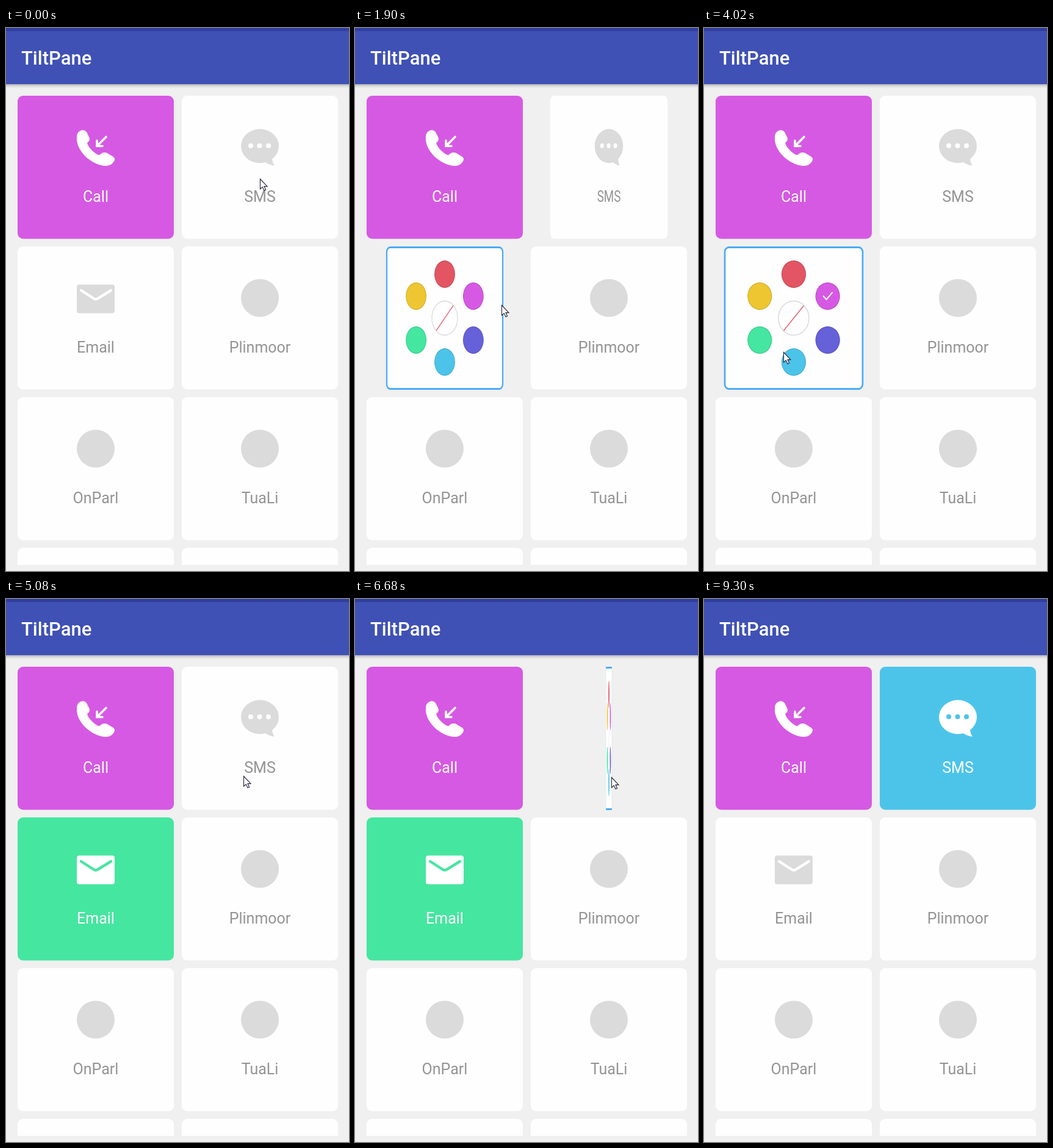
Recreate the animation shown at these times as an HTML page. Size 562 by 890 pixels, loop 9550 ms.

```html
<!DOCTYPE html>
<html lang="en">
<head>
<meta charset="utf-8">
<title>Flip cards</title>
<style>
  html, body { margin: 0; width: 100%; height: 100%; overflow: hidden; background: #f0f0f0; }
  svg { display: block; width: 100%; height: 100%; }
  text { font-family: Roboto, "Liberation Sans", sans-serif; }
  .label { font-size: 25px; text-anchor: middle; }
  .line { stroke-linecap: round; }
</style>
</head>
<body>
<svg id="stage" viewBox="0 0 562 890">
  <defs>
    <linearGradient id="shade" x2="0" y2="1">
      <stop offset="0" stop-color="#000" stop-opacity=".27"/>
      <stop offset=".5" stop-color="#000" stop-opacity=".08"/>
      <stop offset="1" stop-color="#000" stop-opacity="0"/>
    </linearGradient>
    <clipPath id="list"><rect width="562" height="880"/></clipPath>
  </defs>
  <rect width="562" height="890" fill="#f0f0f0"/>
  <g id="cards" clip-path="url(#list)"></g>
  <rect y="92" width="562" height="7" fill="url(#shade)"/>
  <rect width="562" height="92" fill="#3f51b5"/>
  <rect width="562" height="5" fill="#303f9f"/>
  <text x="25" y="60" font-size="31" font-weight="500" fill="#fff">TiltPane</text>
  <path id="cursor" d="M.5 .5V17L4.3 13.6L7 19.4L9.6 18.2L7 12.6H12Z" fill="#fff" stroke="#23233a" stroke-width="1.1"/>
</svg>
<script>
const LOOP = 9550, FLIP = 500;
const WHITE = '#fefefe', GREY = '#dbdbdb', TEXT = '#949494';
const COLORS = ['#e35562', '#d659e3', '#6661d9', '#4cc4ea', '#45e6a0', '#edc632'];
const NONE = -1, PURPLE = 1, CYAN = 3, GREEN = 4;

const $ = id => document.getElementById(id);

function add(parent, tag, attrs, text) {
  const el = document.createElementNS('http://www.w3.org/2000/svg', tag);
  for (const name in attrs) el.setAttribute(name, attrs[name]);
  if (text) el.textContent = text;
  parent.appendChild(el);
  return el;
}

// Drawn around the card centre; "ink" is the icon, "gap" shows the card colour.
const ICONS = {
  phone: `<path class="ink" d="M-27-59Q-20-64-15-58L-11-50Q-8-45-14-40C-12-32-1-22 6-20Q11-26 18-24L28-18Q33-15 30-10Q25-2 16-2.5C-8-4-33-28-31-50Q-31-56-27-59Z"/>
    <path class="ink line" d="M17-50L3-36M2-44V-35H11" stroke-width="3.6"/>`,
  bubble: `<ellipse class="ink" cy="-35" rx="31" ry="28"/>
    <path class="ink" d="M8-9Q16-3.5 24-3Q20-8 20-16Z"/>
    <path class="gap line" d="M-15-35.500h.01m14.500 0h.01m14.500 0h.01" stroke-width="8"/>`,
  mail: `<rect class="ink" x="-31" y="-55" width="62" height="47" rx="4"/>
    <path class="gap line" d="M-24-45.500L-3-32Q0-30 3-32L25-45.500" stroke-width="4.4"/>`,
  dot: `<circle class="ink" cy="-33" r="31"/>`
};

function makeFront(parent, label, icon) {
  const g = add(parent, 'g', {});
  const base = add(g, 'rect', { x: -128, y: -117.5, width: 256, height: 234.5, rx: 9, fill: WHITE });
  const art = add(g, 'g', {});
  art.innerHTML = ICONS[icon] || '';
  const text = add(g, 'text', { class: 'label', y: 56.5 }, label);

  function tint(pick) {
    const card = pick < 0 ? WHITE : COLORS[pick];
    const ink = pick < 0 ? GREY : '#fff';
    base.setAttribute('fill', card);
    text.setAttribute('fill', pick < 0 ? TEXT : '#fff');
    for (const el of art.children) {
      const color = el.classList.contains('ink') ? ink : card;
      const line = el.classList.contains('line');
      el.setAttribute('fill', line ? 'none' : color);
      if (line) el.setAttribute('stroke', color);
    }
  }
  return { g, tint };
}

const spot = i => {
  const a = i * Math.PI / 3;
  return [72 * Math.sin(a), -72 * Math.cos(a)];
};

function makeBack(parent) {
  const g = add(parent, 'g', { visibility: 'hidden' });
  add(g, 'rect', { x: -126.5, y: -116, width: 253, height: 232, rx: 7.5,
    fill: WHITE, stroke: '#4babf8', 'stroke-width': 3 });
  COLORS.forEach((color, i) => {
    const [cx, cy] = spot(i);
    add(g, 'circle', { cx, cy, r: 22.5, fill: color });
    add(g, 'circle', { cx, cy, r: 21.8, fill: 'none', stroke: '#000', 'stroke-opacity': .1, 'stroke-width': 1.5 });
  });
  add(g, 'circle', { r: 28, fill: WHITE, stroke: '#d9d9d9', 'stroke-width': 1.6 });
  add(g, 'path', { d: 'M-18.500 20.500L18.500-20.500', stroke: '#e0616c', 'stroke-width': 1.7 });
  const check = add(g, 'path', { d: 'M-8.500 -.5L-2.500 5.500L9-6.500', fill: 'none', stroke: '#fff', 'stroke-width': 2 });

  function mark(pick) {
    check.setAttribute('visibility', pick < 0 ? 'hidden' : 'inherit');
    if (pick >= 0) check.setAttribute('transform', `translate(${spot(pick)})`);
  }
  return { g, mark };
}

function makeCard(index, label, icon, pick = NONE) {
  const x = 147 + 269 * (index % 2);
  const y = 228.5 + 247 * Math.floor(index / 2);
  const g = add($('cards'), 'g', { transform: `translate(${x} ${y})` });
  const card = { x, y, g, flips: [], front: makeFront(g, label, icon), back: makeBack(g) };
  card.front.tint(pick);
  return card;
}

makeCard(0, 'Call', 'phone', PURPLE);
const sms = makeCard(1, 'SMS', 'bubble');
const email = makeCard(2, 'Email', 'mail');
['Plinmoor', 'OnParl', 'TuaLi'].forEach((name, i) => makeCard(3 + i, name, 'dot'));
makeCard(6);
makeCard(7);

// Pointer story: a stop with a card is a click, one with a pick closes that card.
const STORY = [
  { t: 230, x: 416, y: 247, card: sms },
  { t: 1560, x: 230, y: 415, card: email },
  { t: 1900, x: 240, y: 454 },
  { t: 2560, x: 206, y: 438, card: email, pick: PURPLE },
  { t: 2880, x: 374, y: 440 },
  { t: 3647, x: 200, y: 470, card: email },
  { t: 4020, x: 130, y: 531 },
  { t: 4570, x: 84, y: 512, card: email, pick: GREEN },
  { t: 5080, x: 389, y: 290 },
  { t: 5800, x: 422, y: 205, card: sms },
  { t: 6435, x: 420, y: 292, card: sms, pick: CYAN },
  { t: 7490, x: 194, y: 436, card: email },
  { t: 7800, x: 191, y: 454 },
  { t: 8450, x: 147, y: 474, card: email, pick: NONE },
  { t: 9300, x: 566, y: 895 }
];

// Opening a card closes the one left open.
let opened = null;
for (const { t, card, pick } of STORY) {
  if (!card) continue;
  if (opened && opened !== card) opened.flips.push({ t, open: false, pick: NONE });
  const open = pick === undefined;
  card.flips.push({ t, open, pick });
  opened = open ? card : null;
}

// The pointer rests around each click.
const stops = STORY.flatMap(s => s.card ? [{ ...s, t: s.t - 200 }, { ...s, t: s.t + 250 }] : [s]);

function drawCard({ x, y, g, flips, front, back }, t) {
  let turn = 1, open = false, pick = NONE;
  for (const flip of flips) {
    if (flip.t > t) break;
    const u = Math.min(1, (t - flip.t) / FLIP);
    turn = Math.cos(Math.PI * (1 - Math.cos(Math.PI * u)) / 2);
    open = turn > 0 ? !flip.open : flip.open;
    if (!flip.open) pick = flip.pick;
  }
  const width = Math.max(.004, Math.abs(turn));
  g.setAttribute('transform', `translate(${x} ${y}) scale(${width} 1)`);
  front.g.setAttribute('visibility', open ? 'hidden' : 'visible');
  back.g.setAttribute('visibility', open ? 'visible' : 'hidden');
  front.tint(pick);
  back.mark(pick);
}

function drawCursor(t) {
  const next = stops.findIndex(s => s.t > t);
  const b = stops[next < 0 ? stops.length - 1 : next];
  const a = next < 0 ? b : stops[next - 1];
  const u = a === b ? 0 : (t - a.t) / (b.t - a.t);
  const e = u * u * (3 - 2 * u);
  $('cursor').setAttribute('transform', `translate(${a.x + (b.x - a.x) * e} ${a.y + (b.y - a.y) * e})`);
}

const begin = performance.now();
function tick() {
  const t = Math.max(0, performance.now() - begin) % LOOP;
  drawCard(sms, t);
  drawCard(email, t);
  drawCursor(t);
  requestAnimationFrame(tick);
}
stops[0].t = 0;
tick();
</script>
</body>
</html>
```
